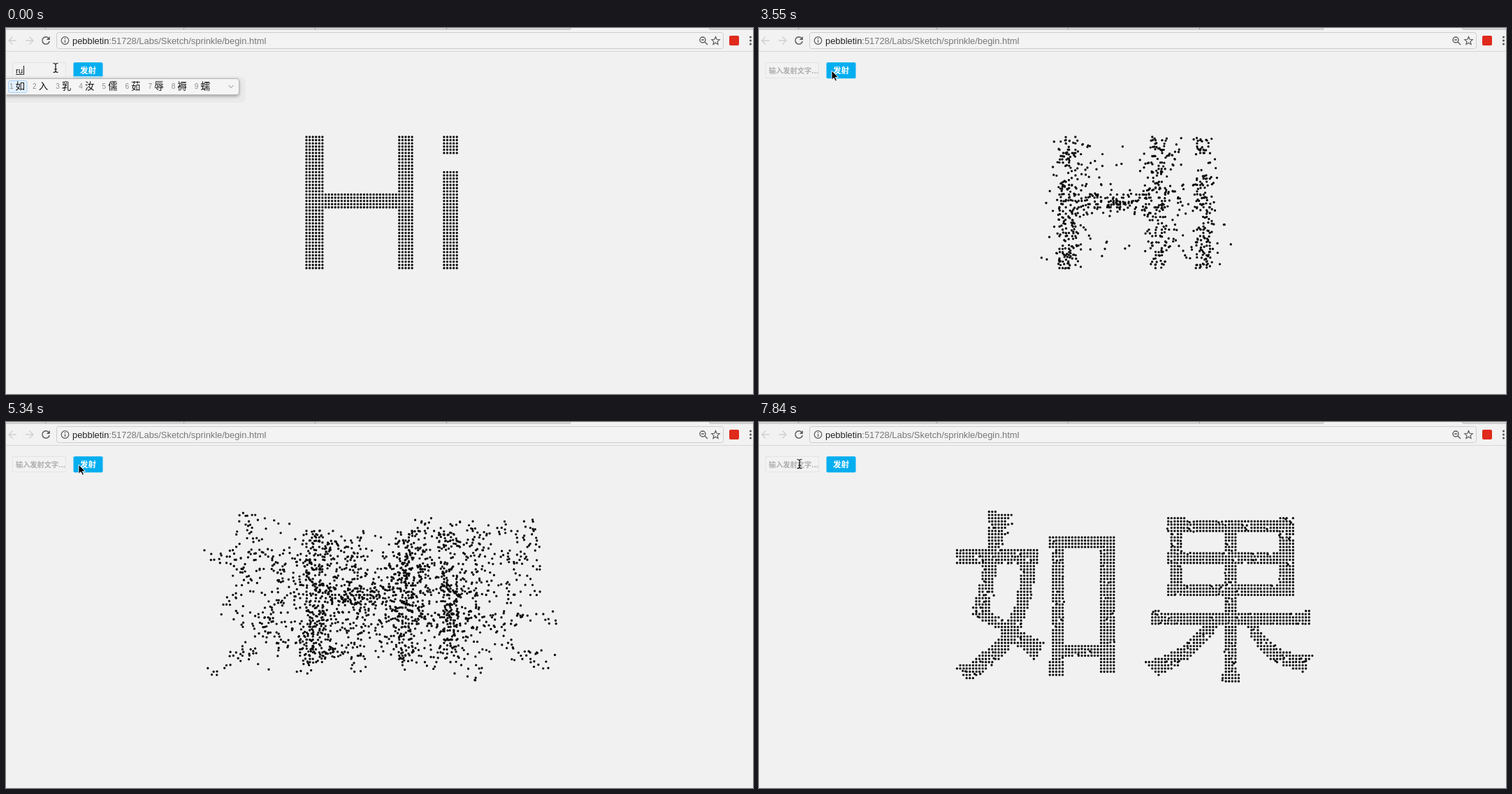
An HTML page with a canvas that plays this animation: 1069x524 px, repeating every 8 s.

```html
<!DOCTYPE html>
<html lang="zh">
<head>
<meta charset="utf-8">
<style>
  html, body { margin: 0; width: 100%; height: 100%; overflow: hidden; background: #f1f1f1; }
  canvas, svg { position: absolute; left: 0; top: 0; }
  text { font-family: "Noto Sans CJK SC", "Noto Sans CJK", sans-serif; white-space: pre; }
  .latin { font-family: "Liberation Sans", Arial, sans-serif; }
  .line { fill: none; stroke: #5a5a5a; stroke-width: 1.4; }
  .faint { stroke: #d0d0d0; }
  #panel { filter: drop-shadow(0 2px 2px rgba(0, 0, 0, .3)); }
</style>
</head>
<body>
<canvas id="stage" width="1069" height="524"></canvas>
<svg width="1069" height="524" viewBox="0 0 1069 524">
  <!-- browser bar -->
  <rect width="1069" height="34" fill="#f2f2f2"/>
  <path d="M0 0H808V2H0zM1006 0H1069V2H1006z" fill="#dedede"/>
  <path d="M0 2H807Q808 2 808 0M1006 0Q1007 2 1009 2H1069" fill="none" stroke="#b4b4b4"/>
  <path d="M56.5 0V2M254.5 0V2M442.5 0V2M630.5 0V2" stroke="#999"/>
  <path d="M0 33.5H1069" stroke="#d8d8d8"/>
  <path class="line faint" d="M15 18H4.500M9.500 12.500L4 18L9.500 23.500M28 18H38.500M33.500 12.500L39 18L33.500 23.500"/>
  <path class="line" d="M61.300 14.800A5.200 5.200 0 1 0 62.200 19"/>
  <path d="M62.800 12V17H57.800z" fill="#5a5a5a"/>
  <rect x="72.500" y="6.500" width="954" height="23" rx="3" fill="#f3f3f3" stroke="#cdcdcd"/>
  <circle class="line" cx="84.500" cy="18" r="5.300" style="stroke-width:1.200"/>
  <path d="M84.500 17.200V21M84.500 14.600V16" stroke="#5a5a5a" stroke-width="1.300"/>
  <text class="latin" x="95" y="22.500" font-size="12.900" fill="#777"><tspan fill="#222">pebbletin</tspan>:51728/Labs/Sketch/sprinkle/begin.html</text>
  <circle class="line" cx="997" cy="17" r="4"/>
  <path class="line" d="M1000 20L1004 24M995 17H999"/>
  <path class="line" style="stroke-width:1.200" d="M1015.500 12.500L1017.100 16.300L1021.200 16.700L1018.100 19.400L1019 23.400L1015.500 21.300L1012 23.400L1012.900 19.400L1009.800 16.700L1013.900 16.300z"/>
  <rect x="1035" y="11" width="14" height="14" rx="2" fill="#df2a1c"/>
  <g fill="#5a5a5a"><circle cx="1065.500" cy="13" r="1.600"/><circle cx="1065.500" cy="18" r="1.600"/><circle cx="1065.500" cy="23" r="1.600"/></g>

  <!-- form -->
  <rect x="9.500" y="49.500" width="76" height="22" fill="#f2f2f2" stroke="#e4e4e4"/>
  <text id="entry" x="14" y="65"></text>
  <path id="underline" stroke="#222"/>
  <path id="caret" stroke="#111"/>
  <rect x="96.500" y="49.300" width="42" height="23" rx="2" fill="#05aeef"/>
  <text x="117.500" y="65.300" font-size="11.500" font-weight="700" fill="#fff" text-anchor="middle">发射</text>

  <g id="popup">
    <path d="M0 69H333Q343 69 343 79V97Q343 107 333 107H0z" fill="#e9e9e9" opacity=".8"/>
    <path id="panel" d="M0 72.500H330Q333.500 72.500 333.500 76V92Q333.500 95.500 330 95.500H0" fill="#f5f5f5" stroke="#b5b5b5"/>
    <rect id="chosen" x="3.500" y="75.500" height="17" rx="2.500" fill="#e4f1fe" stroke="#a9cff3"/>
    <g id="words"></g>
    <path d="M318.500 82L322 85.500L325.500 82" fill="none" stroke="#888"/>
  </g>
  <path id="arrow" d="M0 0V13.200L3.100 10.400L5.200 15L7.400 14L5.300 9.600H9.400z" fill="#000" stroke="#fff" stroke-width=".9"/>
  <path id="beam" d="M-3.500 -6.500Q0 -6.500 0 -4.500Q0 -6.500 3.500 -6.500M0 -4.500V4.500M-3.500 6.500Q0 6.500 0 4.500Q0 6.500 3.500 6.500M-2 2H2" fill="none" stroke="#111" stroke-width="1.200"/>
</svg>
<script>
const LOOP = 8000, LAUNCH = 2340, SPREAD = 3050, FLIGHT = 3000;
const PITCH = 4.58, LEFT = 283.4, TOP = 128.5;
const $ = id => document.getElementById(id);
const ctx = $('stage').getContext('2d');

const rect = (x1, y1, x2, y2) => `M${x1} ${y1}H${x2}V${y2}H${x1}z`;

const hiShape = [
  rect(428, 154, 455, 346), rect(561, 154, 584, 346), rect(455, 236, 561, 259),
  rect(625, 154, 648, 181), rect(625, 204, 648, 346)
];

const wordShape = [
  // 女
  'M326 126H340V131H363L353 158L346 184L341 205L335 240L330 271L375 299L409 317L395 341L356 310L345 297L327 288L304 277V272L314 240L319 205L324 184L327 170z',
  rect(281, 181, 400, 204),
  'M374 203H397L392 240L386 265L377 290L368 312L353 331L335 346L322 357L307 369H296L281 354L287 346H299L320 329L345 310L352 288L366 265L371 240z',
  // 口
  rect(414, 163, 511, 181), rect(418, 163, 437, 360), rect(414, 342, 437, 364),
  rect(488, 163, 511, 360), rect(418, 319, 511, 336),
  // 果
  rect(584, 140, 767, 158), rect(588, 136, 606, 250), rect(584, 136, 610, 142),
  rect(744, 136, 767, 250), rect(584, 187, 767, 203), rect(584, 232, 767, 250),
  rect(666, 140, 684, 373), rect(661, 360, 689, 373),
  rect(561, 273, 790, 291), rect(561, 268, 574, 275), rect(780, 268, 790, 275),
  'M637 290L620 309L605 322L580 335L551 343L571 363L600 349L625 331L645 310L658 290z',
  'M712 290L725 308L745 323L765 332L795 333L779 359L765 354L740 345L720 331L705 310L698 290z'
];

// Grid points covered by a set of outlines
function gridDots(shape) {
  const paths = shape.map(d => new Path2D(d)), dots = [];
  for (let c = 0; c < 112; c++)
    for (let r = 0; r < 54; r++) {
      const x = LEFT + c * PITCH, y = TOP + r * PITCH;
      if (paths.some(p => ctx.isPointInPath(p, x, y))) dots.push({ x, y });
    }
  return dots;
}

let seed = 20;
function random() {
  seed = (seed * 1664525 + 1013904223) % 4294967296;
  return seed / 4294967296;
}

const hiDots = gridDots(hiShape);
const flyers = gridDots(wordShape).map(to => ({
  to,
  from: hiDots[Math.floor(random() * hiDots.length)],
  delay: random() * SPREAD
}));

const ease = p => p < .5 ? 4 * p ** 3 : 1 - 4 * (1 - p) ** 3;
const mix = (a, b, k) => a + (b - a) * k;

function drawDots(t) {
  ctx.clearRect(0, 0, 1069, 524);
  ctx.fillStyle = '#0c0c0c';
  ctx.beginPath();
  const dot = (x, y) => { ctx.moveTo(x + 1.7, y); ctx.arc(x, y, 1.7, 0, 7); };
  if (t < LAUNCH) hiDots.forEach(d => dot(d.x, d.y));
  else for (const { from, to, delay } of flyers) {
    const p = (t - LAUNCH - delay) / FLIGHT;
    if (p < 0) continue;
    const k = ease(Math.min(p, 1));
    dot(mix(from.x, to.x, k), mix(from.y, to.y, k));
  }
  ctx.fill();
}

const typing = [
  { at: 0, text: 'ru', caret: 25.5, words: '如 入 乳 汝 儒 茹 辱 褥 蠕' },
  { at: 150, text: 'ru g', caret: 33.5, words: '如果 入关 入股 入宫 如 入' },
  { at: 990, text: 'ru guo', caret: 46.5, words: '如果 入国 如过 如 入 乳 汝 儒' },
  { at: 1290, text: '如果', caret: 35.5 },
  { at: 2340, text: '输入发射文字...' }
];

let shown;
function showEntry(t) {
  const step = typing.findLast(s => t >= s.at);
  const caretOn = step.caret && !(t >= 690 && t < 990);
  $('caret').setAttribute('d', caretOn ? `M${step.caret} 54V67` : '');
  if (step === shown) return;
  shown = step;
  const { text, caret, words } = step, entry = $('entry');
  entry.textContent = text;
  entry.setAttribute('class', words ? 'latin' : '');
  entry.setAttribute('font-size', words ? 11.5 : 10.2);
  entry.setAttribute('font-weight', words ? 400 : 700);
  entry.setAttribute('fill', caret ? '#111' : '#adadad');
  $('underline').setAttribute('d', words ? `M14 66.500H${caret - 1}` : '');
  $('popup').style.display = words ? '' : 'none';
  if (!words) return;
  let x = 5;
  const list = words.split(' ');
  $('words').innerHTML = list.map((w, i) => {
    const item = `<text class="latin" x="${x}" y="87" font-size="10" fill="#8c8c8c">${i + 1}</text>` +
      `<text x="${x + 8.6}" y="88.300" font-size="13.500" fill="#111">${w}</text>`;
    x += 19.6 + 13.5 * w.length;
    return item;
  }).join('');
  $('chosen').setAttribute('width', 13 + 13.5 * list[0].length);
}

const moves = [
  [0, 71, 57], [1400, 71, 57], [1730, 88, 63], [2030, 104, 61],
  [7050, 104, 61], [7750, 58, 60], [LOOP, 58, 60]
];

function movePointer(t) {
  const i = moves.findIndex(m => m[0] > t);
  const [t1, x1, y1] = moves[i - 1], [t2, x2, y2] = moves[i];
  const k = (t - t1) / (t2 - t1), x = mix(x1, x2, k), y = mix(y1, y2, k);
  for (const id of ['arrow', 'beam']) {
    $(id).setAttribute('transform', `translate(${x} ${y})`);
    $(id).style.display = (id === 'arrow') === (x > 86) ? '' : 'none';
  }
}

const start = performance.now();
function frame() {
  const t = (performance.now() - start) % LOOP;
  drawDots(t);
  showEntry(t);
  movePointer(t);
  requestAnimationFrame(frame);
}
frame();
</script>
</body>
</html>
```
